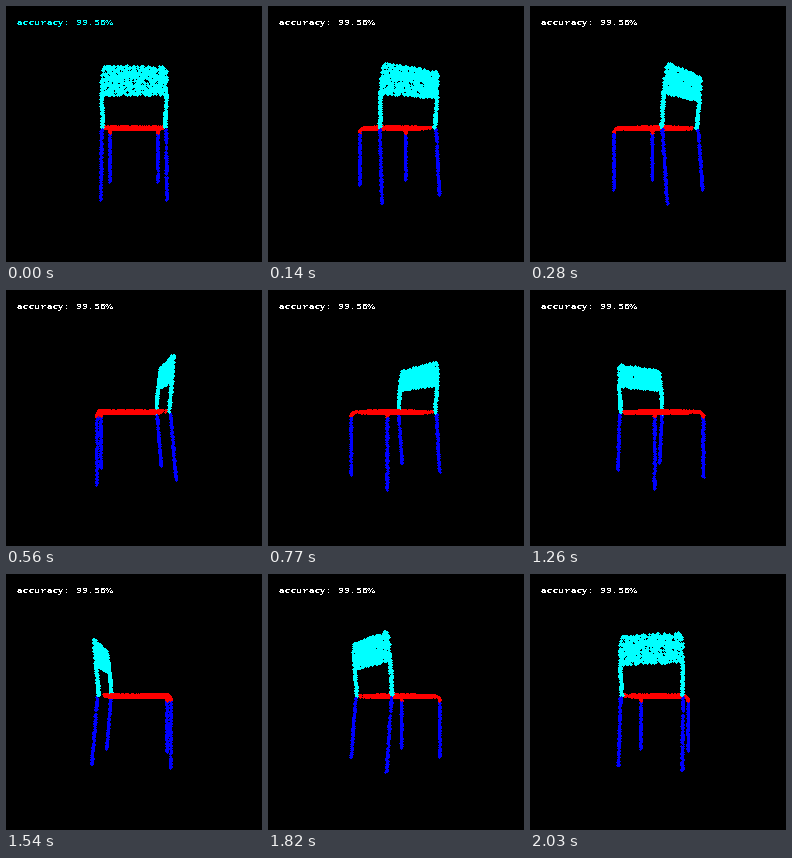
Recreate the animation shown at these times as a matplotlib script. Size 256 px wide and 256 px high, loop 2.1 s.

```python
import numpy as np
import matplotlib.pyplot as plt
from matplotlib.animation import FuncAnimation

SIZE, FRAMES, STEP_MS = 256, 30, 70
CAM = 203          # camera distance
MID = 128          # projection centre
CYAN, RED, BLUE = (0, 1, 1), (1, 0, 0), (0, 0, 1)
BALL = [(0, 0), (1, 0), (-1, 0), (0, 1), (0, -1)]

plt.rcParams["text.antialiased"] = False
rng = np.random.default_rng(7)


def tube(a, b, n, radius=0.7):
    """Random points on a thin rod from a to b (x, y down, z)."""
    a, b = np.array(a, float), np.array(b, float)
    off = rng.normal(size=(n, 3))
    off *= radius / np.linalg.norm(off, axis=1, keepdims=True)
    return a + rng.random((n, 1)) * (b - a) + off


def back_z(y):
    return 28.3 - 0.092 * (y + 5)


def backrest(n):
    x = rng.uniform(-28, 28, n)
    y = rng.uniform(-56.8, -32.4, n)
    r = 6
    dx, dy = np.abs(x) - (28 - r), (-56.8 + r) - y
    keep = (dx < 0) | (dy < 0) | (np.hypot(dx, dy) < r)
    z = back_z(y) + rng.choice([-0.6, 0.6], n)
    return np.column_stack([x, y, z])[keep]


def seat(n):
    x = rng.uniform(-26.5, 26.5, n)
    z = rng.uniform(-33.5, 26, n)
    y = -5.7 + rng.choice([-0.7, 0.7], n)
    return np.column_stack([x, y, z])


def corner(side, n):
    """Bend joining a front leg to the seat."""
    t = rng.uniform(0, np.pi / 2, n)
    bend = 1 - np.cos(t)
    pts = np.column_stack([side * (28 - 3.5 * bend),
                           -1.2 - 4.5 * np.sin(t),
                           -34.3 + 3.5 * bend])
    return pts + rng.uniform(-0.7, 0.7, (n, 3))


parts = [(backrest(1050), CYAN), (seat(1300), RED)]
for s in (-1, 1):
    parts += [
        (tube((s * 26.8, -5.5, back_z(-5)), (s * 27.5, -34, back_z(-34)), 130, 1), CYAN),
        (tube((s * 27.6, -4, 29.5), (s * 27.4, 56, 34.7), 170), BLUE),
        (tube((s * 28, -1, -34.3), (s * 28, 56.3, -34.3), 160), BLUE),
        (corner(s, 60), RED),
    ]
cloud = np.vstack([p for p, _ in parts])
tint = np.vstack([np.tile(c, (len(p), 1)) for p, c in parts]).astype(float)


def render(k):
    a = 2 * np.pi * k / FRAMES
    x, y, z = cloud.T
    u = x * np.cos(a) + z * np.sin(a)
    depth = z * np.cos(a) - x * np.sin(a)
    scale = CAM / (CAM - depth)
    px = np.floor(MID + u * scale).astype(int)
    py = np.floor(MID + y * scale).astype(int)
    order = np.argsort(depth)
    img = np.zeros((SIZE, SIZE, 3))
    for n in order:
        for i, j in BALL:
            img[py[n] + j, px[n] + i] = tint[n]
    return img


fig = plt.figure(figsize=(2.56, 2.56), dpi=100, facecolor="black")
ax = fig.add_axes([0, 0, 1, 1])
ax.axis("off")
view = ax.imshow(render(0), interpolation="nearest", extent=(0, SIZE, SIZE, 0))
# Monospaced caption: one glyph per 6 px cell
label = [ax.text(13 + 6 * i, 19, c, family="DejaVu Serif", weight="bold",
                 size=6.1, ha="center", va="baseline")
         for i, c in enumerate("accuracy: 99.56%")]


def update(k):
    view.set_data(render(k))
    for glyph in label:
        glyph.set_color("cyan" if k == 0 else "white")
    return [view, *label]


anim = FuncAnimation(fig, update, frames=FRAMES, interval=STEP_MS, repeat=True,
                     repeat_delay=0)
plt.show()
```
